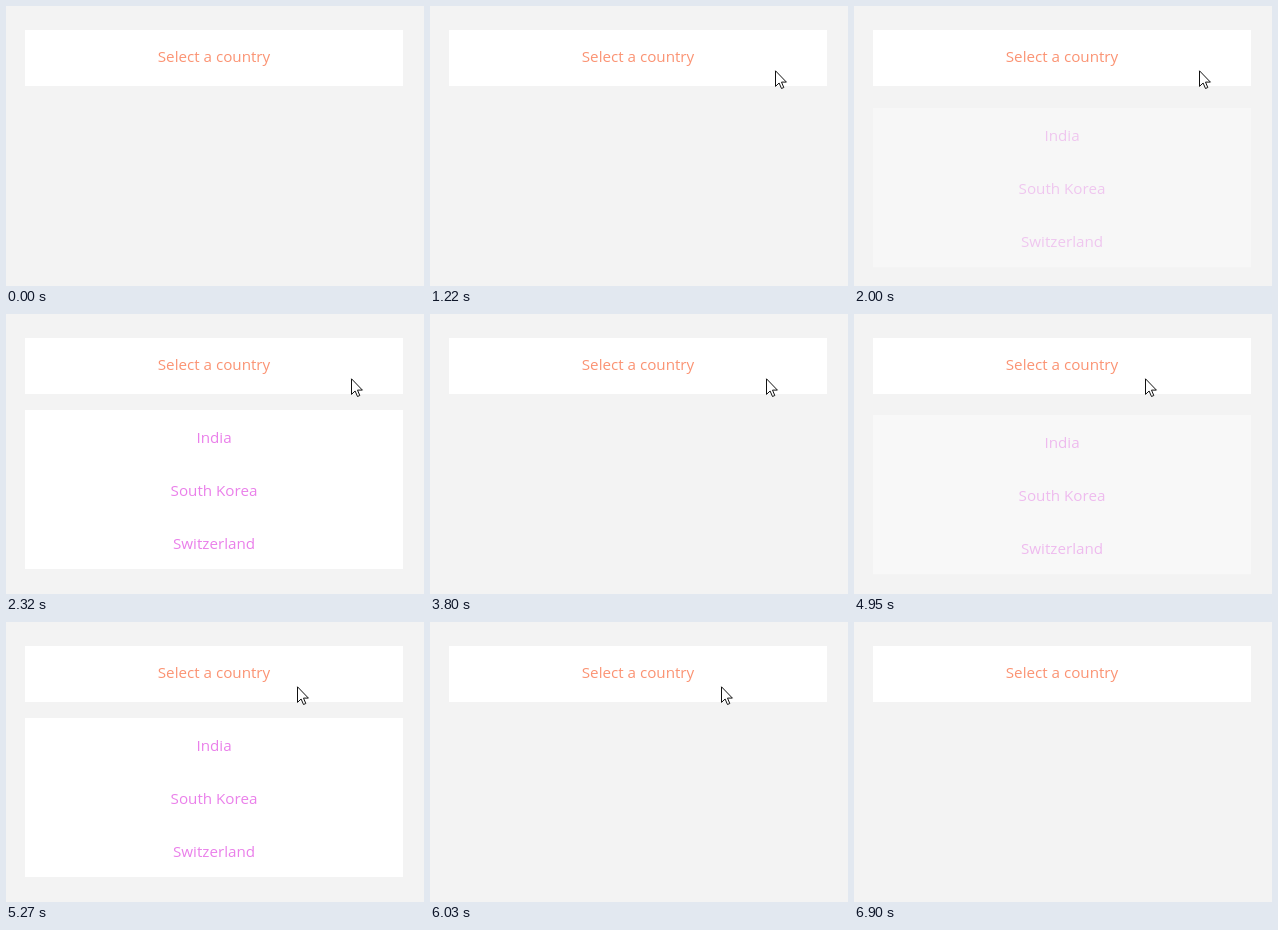
Animation of 418 by 280 pixels, one loop 7.28 s. Source, as an HTML page:

```html
<!DOCTYPE html>
<html lang="en">
<head>
<meta charset="utf-8">
<title>Country menu</title>
<style>
html, body { margin: 0; width: 100%; height: 100%; overflow: hidden; background: #f3f3f3; }
svg { display: block; width: 418px; height: 280px; }
text { font: 15.2px "Open Sans", "Noto Sans", sans-serif; text-anchor: middle; }
#menu text { fill: #ea80ea; }
</style>
</head>
<body>
<svg viewBox="0 0 418 280">
  <rect width="418" height="280" fill="#f3f3f3"/>
  <rect x="19" y="24" width="378" height="56" fill="#fff"/>
  <text x="208" y="56" fill="#fb9373">Select a country</text>
  <g id="menu">
    <rect x="19" y="96" width="378" height="159" fill="#fff"/>
    <text x="208" y="129">India</text>
    <text x="208" y="182">South Korea</text>
    <text x="208" y="235">Switzerland</text>
  </g>
  <g id="cursor">
    <path d="M.5 .8V16.4L4.1 13 6.5 18.5 8.8 17.5 6.5 12.1H11.4Z" fill="#fff" stroke="#111"/>
    <circle id="halo" r="12" fill="#ff0" fill-opacity=".5"/>
  </g>
</svg>
<script>
const LOOP = 7280, TICK = 77, CLICK = 150;
const [menu, cursor, halo] = ['menu', 'cursor', 'halo'].map(id => document.getElementById(id));

// Pointer legs: start, end, number of steps, easing, from, bend, to
const easeOut = p => 1 - (1 - p) ** 1.5;
const easeIn = p => p ** 1.5;
const legs = [
  [450, 990, 8, p => (p * 8 - 1) / 7, [404, 248], [404, 90], [325, 65]],
  [1140, 1220, 2, p => p, [325, 65], [335, 64], [345, 64]],
  [3800, 4410, 9, easeOut, [345, 64], [318, 64], [291, 64]],
  [6360, 6900, 8, easeIn, [291, 64], [352, 175], [401, 284]]
];
const clicks = [1770, 3250, 4640, 5880];
const openings = [[1770, 3400, 2320], [4640, 6030, 5270]];

function pointerAt(t) {
  const leg = legs.filter(l => t >= l[0]).pop() || legs[0];
  const [start, end, steps, ease, a, b, c] = leg;
  const step = Math.min(steps, 1 + Math.floor((t - start) / (end - start) * (steps - 1) + 1e-6));
  const p = ease(Math.max(0, step) / steps), q = 1 - p;
  return a.map((v, i) => Math.round(q * q * v + 2 * q * p * b[i] + p * p * c[i]));
}

function menuAt(t) {
  const span = openings.find(([from, to]) => t >= from && t < to);
  if (!span) return 0;
  if (t >= span[2]) return 1;
  const ticks = Math.floor((t - span[0]) / TICK);
  const p = Math.min(1, ticks * TICK / (span[2] - span[0]));
  return p * p * (3 - 2 * p);
}

function draw(t) {
  const open = menuAt(t);
  menu.setAttribute('opacity', open);
  menu.setAttribute('transform', `translate(0 ${10 * (1 - open)})`);
  cursor.setAttribute('transform', `translate(${pointerAt(t)})`);
  cursor.setAttribute('visibility', t >= 450 && t < 6900 ? 'visible' : 'hidden');
  halo.setAttribute('opacity', clicks.some(c => t >= c && t < c + CLICK) ? 1 : 0);
}

const began = performance.now();
function frame() {
  draw((performance.now() - began) % LOOP);
  requestAnimationFrame(frame);
}
draw(0);
requestAnimationFrame(frame);
</script>
</body>
</html>
```
